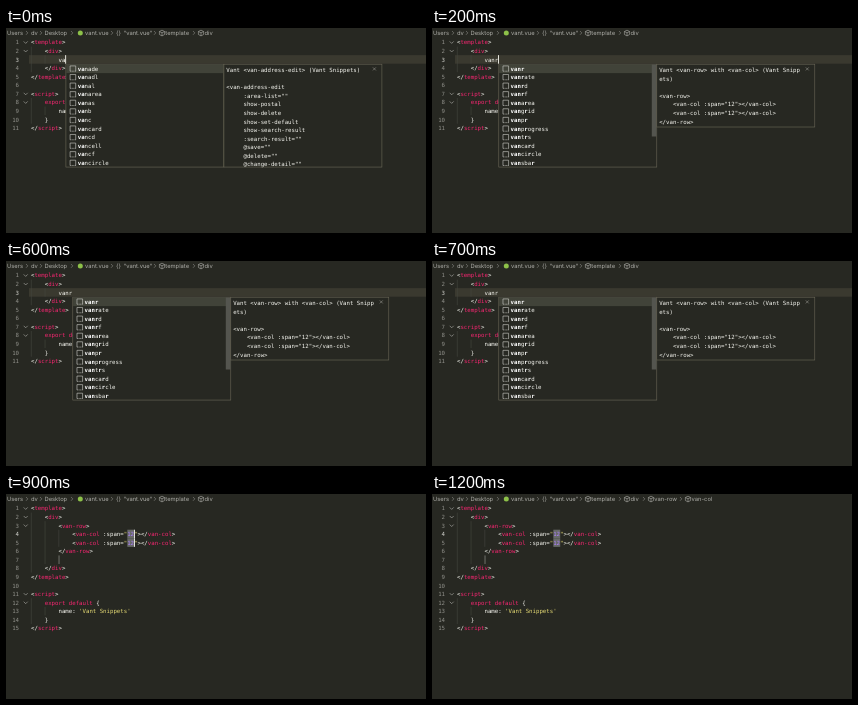
An HTML page for the animation above (1.3 s loop, 420 by 205 pixels).

```html
<!DOCTYPE html>
<html lang="en">
<head>
<meta charset="utf-8">
<title>Snippet completion</title>
<style>
html, body { margin: 0; width: 100%; height: 100%; overflow: hidden; background: #272822; }
svg { display: block; width: 420px; height: 205px; }
text { white-space: pre; text-rendering: geometricPrecision; }
.code { font: 5.714px "DejaVu Sans Mono", "Liberation Mono", monospace; fill: #f8f8f2; }
.crumb { font: 5.8px Inter, "Liberation Sans", sans-serif; fill: #adada8; }
.line { fill: none; stroke-width: .6; }
</style>
</head>
<body>
<svg id="stage" viewBox="0 0 420 205"></svg>
<script>
const LOOP = 1300, CHAR = 3.44, ROW = 8.571, LEFT = 25, TOP = 10;
const RED = '#f92672', YELLOW = '#e6db74', PURPLE = '#ae81ff', BORDER = '#6b6858';
const stage = document.getElementById('stage');

const lineTop = n => TOP + (n - 1) * ROW;
const colX = c => LEFT + c * CHAR;
const esc = s => s.replace(/&/g, '&amp;').replace(/</g, '&lt;');
const span = (s, attrs) => `<tspan ${attrs}>${esc(s)}</tspan>`;
const paint = (s, color) => span(s, `fill="${color}"`);
const rect = (x, y, w, h, fill, extra = '') =>
  `<rect x="${x}" y="${y}" width="${w}" height="${h}" fill="${fill}" ${extra}/>`;
const path = (d, stroke) => `<path class="line" d="${d}" stroke="${stroke}"/>`;
const code = (x, y, inner, extra = '') => `<text class="code" x="${x}" y="${y}" ${extra}>${inner}</text>`;

function highlight(line) {
  const token = /(<\/?)([\w-]+)|(export default)|('[^']*')|(")(\d+)(")/g;
  let out = '', last = 0;
  for (const m of line.matchAll(token)) {
    out += esc(line.slice(last, m.index));
    if (m[1]) out += esc(m[1]) + paint(m[2], RED);
    else if (m[3]) out += paint(m[3], RED);
    else if (m[4]) out += paint(m[4], YELLOW);
    else out += paint(m[5], YELLOW) + paint(m[6], PURPLE) + paint(m[7], YELLOW);
    last = m.index + m[0].length;
  }
  return out + esc(line.slice(last));
}

const document_ = body => [
  '<template>', '    <div>', ...body, '    </div>', '</template>', '',
  '<script>', '    export default {', "        name: 'Vant Snippets'", '    }', '<\/script>'
];
const column = '            <van-col :span="12"></van-col>';
const expanded = document_(['        <van-row>', column, column, '        </van-row>', '        ']);

const lists = {
  va: 'vanade vanadl vanal vanarea vanas vanb vanc vancard vancd vancell vancf vancircle',
  vanr: 'vanr vanrate vanrd vanrf vanarea vangrid vanpr vanprogress vantrs vancard vancircle vansbar'
};
const addressDoc = ['Vant <van-address-edit> (Vant Snippets)', '', '<van-address-edit',
  ...[':area-list=""', 'show-postal', 'show-delete', 'show-set-default', 'show-search-result',
    ':search-result=""', '@save=""', '@delete=""', '@change-detail=""'].map(s => '     ' + s)];
const rowDoc = ['Vant <van-row> with <van-col> (Vant Snipp', 'ets)', '', '<van-row>',
  '    <van-col :span="12"></van-col>', '    <van-col :span="12"></van-col>', '</van-row>'];

function breadcrumbs(deep) {
  let out = '';
  const label = (x, s) => out += `<text class="crumb" x="${x}" y="7">${esc(s)}</text>`;
  const arrow = x => out += path(`M${x - 1} 3l1.8 1.9-1.8 1.9`, '#8d8d88');
  const cube = x => out += path(`M${x} 2.2l2.6 1.3v3L${x} 7.9l-2.6-1.4v-3zM${x - 2.6} 3.5l2.6 1.3 2.6-1.3M${x} 4.8v3.1`, '#adada8');
  label(1, 'Users'); arrow(21);
  label(25, 'dv'); arrow(35);
  label(38.5, 'Desktop'); arrow(66);
  out += '<circle cx="74.3" cy="5" r="2.5" fill="#8dc149"/>';
  label(79, 'vant.vue'); arrow(106);
  label(110, '{}'); label(117.5, '"vant.vue"'); arrow(149);
  cube(156); label(159.3, 'template'); arrow(188);
  cube(195); label(198.5, 'div');
  if (deep) {
    arrow(212); cube(219); label(222.3, 'van-row');
    arrow(249); cube(256); label(259.5, 'van-col');
  }
  return out;
}

function guides(ranges) {
  return ranges.map(([col, from, to]) =>
    path(`M${colX(col) + .3} ${lineTop(from)}V${lineTop(to + 1)}`, '#464741')).join('');
}

function editor(lines, active, folds) {
  let out = folds.map(n =>
    path(`M17.7 ${lineTop(n) + 3.4}l2 2 2-2`, '#b5b5b0')).join('');
  lines.forEach((line, i) => {
    const y = lineTop(i + 1) + 6.4;
    const color = i + 1 === active ? '#d5d5d0' : '#90908a';
    out += code(13, y, i + 1, `text-anchor="end" style="fill:${color}"`);
    out += code(LEFT, y, highlight(line));
  });
  return out;
}

const caret = (col, line) => rect(colX(col) - .2, lineTop(line), .9, ROW, '#f8f8f0');

// Bold the letters that match the typed prefix in order.
function matched(word, typed) {
  let k = 0;
  return [...word].map(c => c === typed[k]
    ? (k++, span(c, 'font-weight="bold" fill="#fff"')) : esc(c)).join('');
}

function suggestions(typed) {
  const x = colX(8 + typed.length) + .5, y = lineTop(4) + .5, w = 158, h = 12 * ROW;
  const row = typed === 'vanr', words = lists[row ? 'vanr' : 'va'].split(' ');
  const doc = row ? rowDoc : addressDoc;
  const dx = x + w, dh = row ? 62.8 : h;
  const frame = (left, height) => rect(left, y, w, height, '#272822', `stroke="${BORDER}" stroke-width=".6"`);
  let out = frame(x, h) + rect(x + .3, y + .3, w - .6, ROW, '#414339');
  words.forEach((word, i) => {
    const ty = y + i * ROW;
    out += path(`M${x + 4.2} ${ty + 7}V${ty + 1.7}h5.6V${ty + 7}`, '#d0d0cb');
    out += `<path class="line" d="M${x + 4.2} ${ty + 7}h5.8" stroke="#d0d0cb" stroke-dasharray="1.1 .5"/>`;
    out += code(x + 11.8, ty + 6.4, matched(word, typed));
  });
  if (row) out += rect(x + w - 5, y + .3, 4.7, 72, '#54554f');
  out += frame(dx, dh);
  doc.forEach((line, i) => out += code(dx + 2.4, y + 8 + i * ROW, esc(line)));
  if (typed === 'van') out += rect(dx + w - 5, y + 10.5, 4.7, 80, '#484943');
  const cx = dx + 150.5, cy = y + 4.7;
  return out + path(`M${cx - 1.5} ${cy - 1.5}l3 3m0-3l-3 3`, '#96968f');
}

function typing(typed, blinkOn) {
  return rect(23, lineTop(3), 397, ROW, '#3a392f')
    + guides([[0, 2, 4], [4, 3, 3], [0, 8, 10], [4, 9, 9]])
    + editor(document_(['        ' + typed]), 3, [1, 2, 7, 8])
    + (blinkOn ? caret(8 + typed.length, 3) : '')
    + suggestions(typed);
}

function inserted(blinkOn) {
  const fields = [4, 5].map(n => rect(colX(28), lineTop(n), 2 * CHAR, ROW, '#686a68')).join('');
  return fields
    + guides([[0, 2, 8], [4, 3, 7], [8, 4, 5], [0, 12, 14], [4, 13, 13]])
    + rect(colX(8), lineTop(7), 1, ROW, '#70716b')
    + editor(expanded, 4, [1, 2, 3, 11, 12])
    + (blinkOn ? caret(30, 4) + caret(30, 5) : '');
}

let shown = '';
function render(t) {
  const typed = t < 100 ? 'va' : t < 200 ? 'van' : 'vanr';
  const done = t >= 900, deep = t >= 1200;
  const blinkOn = !deep && !(t >= 600 && t < 800);
  const key = [typed, done, deep, blinkOn].join();
  if (key === shown) return;
  shown = key;
  stage.innerHTML = breadcrumbs(deep) + (done ? inserted(blinkOn) : typing(typed, blinkOn));
}

const start = performance.now();
function tick(now) {
  render(Math.max(0, now - start) % LOOP);
  requestAnimationFrame(tick);
}
render(0);
requestAnimationFrame(tick);
</script>
</body>
</html>
```
